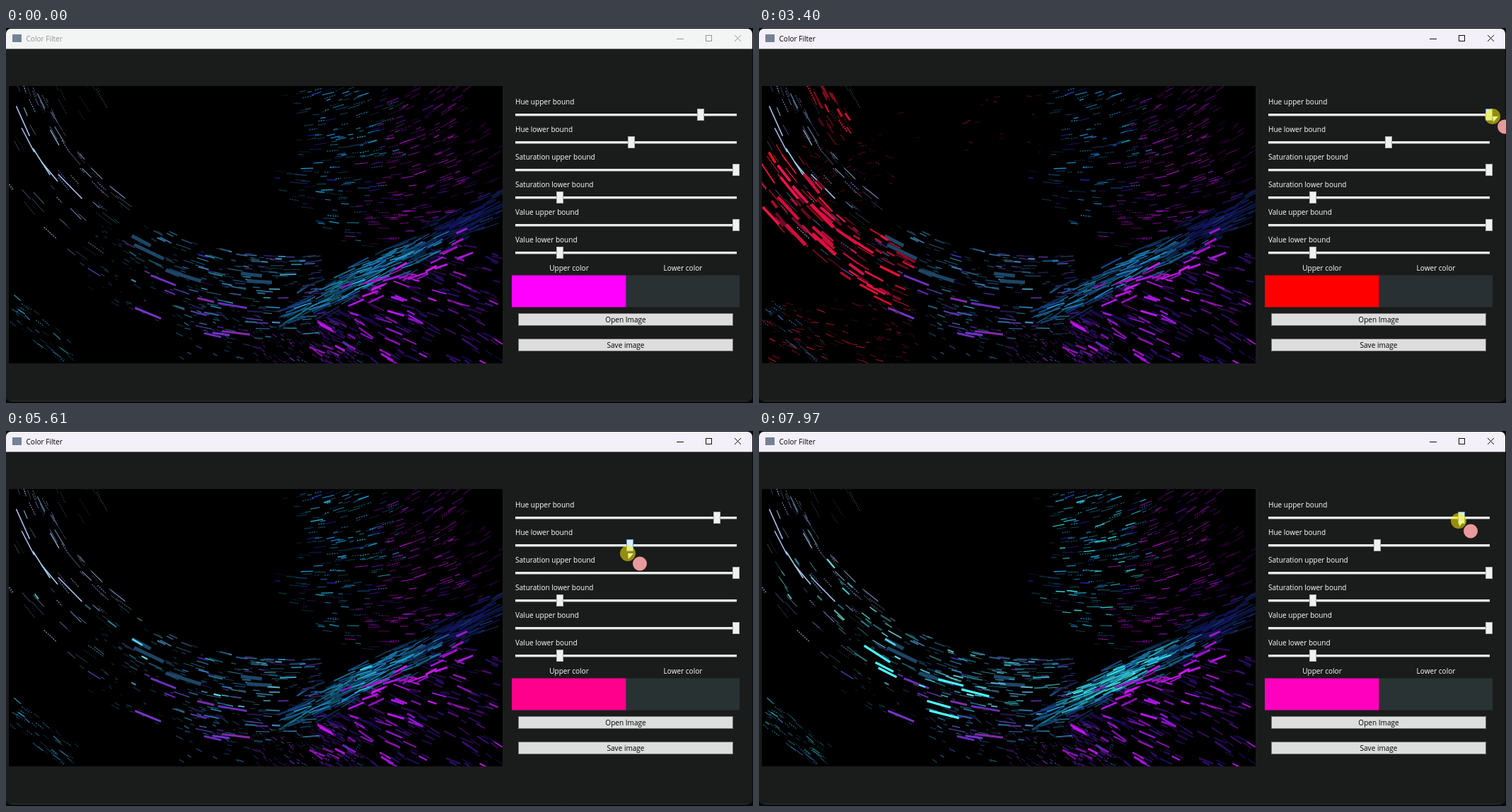
These frames come from a looping animation (1056x530 px, 8000 ms). An HTML page with a canvas:

```html
<!DOCTYPE html>
<html lang="en">
<head>
<meta charset="utf-8">
<title>Color Filter</title>
<style>
html, body { margin: 0; width: 100%; height: 100%; overflow: hidden; background: #000; }
canvas { display: block; }
</style>
</head>
<body>
<canvas id="stage" width="1056" height="530"></canvas>
<script>
const LOOP = 8000, STEP = 70, ENTER = 330, ACTIVATE = 1250;
const TRACK = { x: 720, w: 312, y: 123, gap: 39 };
const VIEW = { x: 4, y: 82, w: 698, h: 392 };
const LABELS = ['Hue upper bound', 'Hue lower bound', 'Saturation upper bound',
  'Saturation lower bound', 'Value upper bound', 'Value lower bound'];
const ctx = document.getElementById('stage').getContext('2d');

// Motion: eased moves of the two hue sliders and of the pointer that drags them
function ease(t, from, to) {
  const k = Math.min(1, Math.max(0, (t - from) / (to - from)));
  return k * k * (3 - 2 * k);
}
const upperAt = t => 982 + 50 * ease(t, 2800, 3280) - 30 * ease(t, 3600, 4440)
  + 3 * ease(t, 4650, 4850) + 13 * ease(t, 7100, 7420) - 25 * ease(t, 7420, 7960);
const lowerAt = t => 884 + 6 * ease(t, 1250, 2200) - 18 * ease(t, 5200, 6000) + 2 * ease(t, 6580, 6740);

function pointerAt(t, upper, lower) {
  const moves = [
    [330, 1110, lower, 167],
    [2220, 2360, 921, 157],
    [2400, 2780, upper + 5, 125],
    [3600, 4600, upper - 2, 134],
    [4900, 5200, lower - 3, 173],
    [6750, 7050, upper - 4, 127]
  ];
  return moves.reduce(([px, py], [from, to, x, y]) => {
    const k = ease(t, from, to);
    return [px + (x - px) * k, py + (y - py) * k];
  }, [1030, 520]);
}
function draggedSlider(t) {
  const within = (a, b) => t >= a && t < b;
  if (within(1250, 2220) || within(5200, 6750)) return 1;
  if (within(2790, 4900) || within(7050, LOOP)) return 0;
  return -1;
}

function hsv(h, s, v) {
  const l = v * (1 - s / 2), m = Math.min(l, 1 - l);
  return `hsl(${h} ${m ? (v - l) / m * 100 : 0}% ${l * 100}%)`;
}

let seed = 20;
function rand() {
  seed = (seed + 0x6D2B79F5) | 0;
  let r = Math.imul(seed ^ (seed >>> 15), 1 | seed);
  r = (r + Math.imul(r ^ (r >>> 7), 61 | r)) ^ r;
  return ((r ^ (r >>> 14)) >>> 0) / 4294967296;
}
const range = (a, b) => a + (b - a) * rand();
const chance = p => rand() < p;
const rad = d => d * Math.PI / 180;
function times(n, make) { for (let i = 0; i < n; i++) make(); }

// The streaks of the picture; each one passes the filter by its hue
const streaks = [];
function add(x, y, angle, len, width, hue, sat, val, dotted) {
  const dx = Math.cos(angle) * len / 2, dy = Math.sin(angle) * len / 2;
  streaks.push({ x, y, dx, dy, width, hue, dotted, color: hsv(hue, sat, val) });
}

// Rings around a point above the picture; phi is measured from straight down
function addArc(phi, r, ...look) {
  const a = rad(phi);
  add(390 - r * Math.sin(a), r * Math.cos(a) - 50, a + range(-.05, .05), ...look);
}
const bandY = x => 386 - (x - 435) * .5;

// Bottom right: purple fan
times(230, () => {
  const x = range(435, 702), y = range(Math.max(305, bandY(x) + 18), 476);
  const angle = rad(range(15, 33) + (y - 400) * .1);
  if (chance(.2)) add(x, y, angle, range(12, 26), range(1.6, 3.2), range(278, 292), .9, range(.6, .95));
  else add(x, y, angle, range(9, 22), range(.9, 2.6), range(250, 280), .88, range(.2, .48));
});
// Bottom centre: fine grains
times(150, () => add(range(345, 505), range(412, 474), rad(range(25, 50)), range(3, 9),
  range(.6, 1.2), chance(.2) ? range(195, 215) : range(255, 288), .8, range(.25, .75), chance(.5)));
times(34, () => add(range(240, 360), range(395, 472), rad(range(12, 42)), range(4, 12),
  range(.6, 1.4), range(192, 212), .8, range(.25, .65)));

// Top centre to right: blue turning magenta
function inUpper(x, y) {
  const bulge = 100 * Math.exp(-(((y - 225) / 30) ** 2)) * rand() ** 1.5;
  const left = 425 - bulge - 40 * rand() ** 2;
  const floor = x < 500 ? 240 + (x - 400) * .8 : 322 - (x - 500) * .45;
  return x > left && y < floor && !(x > 655 && y < 130);
}
const upperAngle = (x, y) => rad(-(x - 420) * .1 + (y - 190) * .13 + range(-4, 4));
times(760, () => {
  const x = range(310, 702), y = range(82, 324);
  if (!inUpper(x, y)) return;
  const angle = upperAngle(x, y), fade = x > 650 || x < 425 ? .6 : 1;
  if (x + range(-35, 35) > 560 - (y - 82) * .25)
    add(x, y, angle, range(6, 19), range(.6, 1.3),
      chance(.25) ? range(258, 280) : range(286, 299), .92, range(.25, .75) * fade, chance(.25));
  else
    add(x, y, angle, range(5, 18), range(.6, 1.5),
      chance(.15) ? range(225, 262) : range(189, 211), .85, range(.22, .85) * fade, chance(.35));
});
times(95, () => {
  const x = range(310, 545), y = range(84, 270);
  if (inUpper(x, y))
    add(x, y, upperAngle(x, y), range(7, 18), range(.8, 1.6), range(176, 188), .75, range(.35, .95));
});

// Left side of the arc: thin pale trails
times(75, () => addArc(range(36, 73), 365 + 115 * rand() ** 2, range(7, 28), range(.6, 1.4),
  range(194, 246), range(.24, .5), range(.25, .85), chance(.5)));
times(5, () => addArc(range(44, 68), range(400, 418), range(36, 50), 1.6, range(200, 232), .28, .92));
times(12, () => addArc(range(58, 70), range(290, 350), range(12, 32), range(.6, 1.1),
  range(220, 250), .3, range(.2, .38), true));
// Lower arc
times(165, () => addArc(36 - 44 * rand() ** .6, 372 + 118 * rand() ** 1.3, range(7, 24), range(.7, 2.3),
  chance(.7) ? range(189, 212) : range(248, 270), range(.6, .82), range(.25, .75)));
times(200, () => addArc(range(-10, 38), range(375, 500), range(3, 9), .7,
  range(189, 215), .75, range(.2, .65)));
times(7, () => addArc(range(5, 24), range(420, 500), range(24, 42), 3, range(262, 284), .75, range(.65, .9)));
times(5, () => addArc(range(-8, 30), range(400, 425), range(28, 58), 5, 206, .72, .4));
// Cyan part of the arc
times(115, () => addArc(60 - 64 * rand() ** .7, 372 + 80 * rand() ** 1.3, range(6, 22), range(.7, 2.3),
  range(176, 188), range(.45, .75), range(.35, .95)));
times(7, () => addArc(range(10, 32), range(420, 475), range(28, 44), 3.2, 181, .7, 1));

// Bottom left corner
times(75, () => {
  const x = range(4, 102);
  add(x, 386 + x * .8 + range(-22, 25), rad(range(34, 44)), range(5, 14), range(.6, 1.3),
    range(178, 213), .75, range(.2, .75), chance(.4));
});

// Diagonal band, denser in its middle
const alongBand = (from, to) => from + (to - from) * (rand() + rand()) / 2;
times(230, () => {
  const x = range(400, 702), far = x > 600;
  add(x, bandY(x) + range(-1, 1) * range(6, 32), rad(range(-33, -18)), range(12, 40), range(.8, 2.6),
    far ? range(212, 245) : range(192, 220), .82, far ? range(.2, .42) : range(.22, .6));
});
times(90, () => {
  const x = alongBand(395, 640);
  add(x, bandY(x) + range(-16, 18), rad(range(-31, -16)), range(10, 32), range(.7, 1.8),
    range(189, 206), .85, range(.5, .9));
});
times(60, () => {
  const x = alongBand(395, 600);
  add(x, bandY(x) + range(-15, 15), rad(range(-30, -17)), range(12, 32), range(.8, 2.2),
    range(177, 188), .75, range(.55, 1));
});
times(24, () => {
  const x = range(480, 650);
  add(x, bandY(x) + range(0, 45), rad(range(-28, -16)), range(12, 30), range(1.8, 3.2),
    range(280, 292), .9, range(.65, .95));
});

// Reds
times(95, () => addArc(range(24, 58), range(405, 490), range(9, 34), range(.8, 4),
  range(340, 354), .92, range(.3, .95)));
times(10, () => addArc(range(30, 54), range(415, 490), range(32, 46), range(3.5, 5), 346, .93, range(.8, 1)));
times(30, () => addArc(range(53, 66), range(315, 355), range(8, 26), range(.8, 3.5),
  range(344, 358), .9, range(.25, .8), chance(.3)));
times(120, () => add(range(6, 225), range(385, 474), rad(range(6, 30)), range(4, 14), range(.6, 1.3),
  range(345, 358), .88, range(.22, .7), chance(.5)));
times(60, () => add(range(60, 190), range(150, 260), rad(range(-40, 60)), range(3, 12), range(.6, 1.2),
  range(345, 358), .88, range(.22, .65), true));
times(18, () => add(range(190, 400), range(95, 185), rad(range(-20, 35)), range(3, 10), range(.6, 1.4),
  range(348, 359), .9, range(.2, .5)));

const picture = document.createElement('canvas');
picture.width = VIEW.w;
picture.height = VIEW.h;
const pic = picture.getContext('2d');
let filtered = '';

function filterPicture(low, high) {
  const key = low + '/' + high;
  if (key === filtered) return;
  filtered = key;
  pic.setTransform(1, 0, 0, 1, 0, 0);
  pic.fillStyle = '#000';
  pic.fillRect(0, 0, VIEW.w, VIEW.h);
  pic.translate(-VIEW.x, -VIEW.y);
  for (const s of streaks) {
    if (s.hue < low || s.hue > high) continue;
    pic.strokeStyle = s.color;
    pic.lineWidth = s.width;
    pic.setLineDash(s.dotted ? [2, 1.5] : []);
    pic.beginPath();
    pic.moveTo(s.x - s.dx, s.y - s.dy);
    pic.lineTo(s.x + s.dx, s.y + s.dy);
    pic.stroke();
  }
}

function box(x, y, w, h, fill, border) {
  ctx.fillStyle = fill;
  ctx.fillRect(x, y, w, h);
  if (!border) return;
  ctx.strokeStyle = border;
  ctx.strokeRect(x + .5, y + .5, w - 1, h - 1);
}
function text(str, x, y, color, align = 'left') {
  ctx.font = '500 10.05px "Open Sans", "Noto Sans", sans-serif';
  ctx.textAlign = align;
  ctx.fillStyle = color;
  ctx.fillText(str, x, y);
}
function line(...points) {
  ctx.beginPath();
  points.forEach(([x, y], i) => i ? ctx.lineTo(x, y) : ctx.moveTo(x, y));
  ctx.stroke();
}
function disc(x, y, r, color) {
  ctx.fillStyle = color;
  ctx.beginPath();
  ctx.arc(x, y, r, 0, 7);
  ctx.fill();
}
const inside = (p, x, y, w, h) => p && p[0] >= x && p[0] < x + w && p[1] >= y && p[1] < y + h;

function drawWindow(active) {
  box(0, 0, 1056, 530, '#050708');
  ctx.save();
  ctx.beginPath();
  ctx.roundRect(0, 1, 1055, 527, 7);
  ctx.clip();
  box(0, 0, 1056, 530, '#1a1c1b');
  box(0, 0, 1056, 29.5, active ? '#f3f0f9' : '#f3f5f4');
  ctx.restore();
  ctx.lineWidth = 1;
  ctx.strokeStyle = '#303536';
  line([7, 527.5], [1048, 527.5]);

  box(9, 9, 13, 11, '#748296');
  text('Color Filter', 28.5, 18.5, active ? '#000' : '#929292');
  ctx.strokeStyle = active ? '#111' : '#969696';
  line([948, 15.5], [958, 15.5]);
  line([1030, 10], [1039, 19]);
  line([1039, 10], [1030, 19]);
  ctx.strokeRect(989.5, 10.5, 8, 8);
}

function drawSlider(i, x, p, dragged) {
  const y = TRACK.y + i * TRACK.gap;
  text(LABELS[i], TRACK.x, y - 15.5, '#fff');
  box(TRACK.x, y - 2, TRACK.w + 1, 3.4, '#e7eaea');
  const thumb = [x - 5, y - 9, 10, 17];
  if (dragged) box(...thumb, '#daecfc', '#569de5');
  else if (inside(p, ...thumb)) box(...thumb, '#dcecfc', '#7eb4ea');
  else box(...thumb, '#f0f0f0', '#acacac');
}

function drawButton(label, y, p) {
  const area = [724, y, 304, 18];
  const hover = inside(p, ...area);
  box(...area, hover ? '#bee6fd' : '#dddddd', hover ? '#3c7fb1' : '#707070');
  text(label, 876, y + 13, '#000', 'center');
}

function drawPointer([x, y], pressed) {
  if (pressed) disc(x, y, 11, 'rgba(255,238,0,.54)');
  ctx.fillStyle = pressed ? '#f4f09a' : '#f4f4f4';
  ctx.beginPath();
  ctx.moveTo(x, y);
  ctx.lineTo(x + 8, y);
  ctx.lineTo(x + 1, y + 8);
  ctx.fill();
  disc(x + 17, y + 14.5, 10, '#e99a9c');
}

function draw(now) {
  const time = now % LOOP;
  const t = time < ENTER ? 0 : ENTER + Math.floor((time - ENTER) / STEP) * STEP;
  const upper = Math.round(upperAt(t)), lower = Math.round(lowerAt(t));
  const p = time < ENTER ? null : pointerAt(t, upper, lower);
  const dragged = draggedSlider(t);
  const hue = x => (x - TRACK.x) / TRACK.w * 360;

  drawWindow(t >= ACTIVATE);
  filterPicture(hue(lower), hue(upper));
  ctx.drawImage(picture, VIEW.x, VIEW.y);

  const full = TRACK.x + TRACK.w, fifth = Math.round(TRACK.x + TRACK.w * .2) + 1;
  [upper, lower, full, fifth, full, fifth].forEach((x, i) => drawSlider(i, x, p, dragged === i));

  text('Upper color', 796, 342.5, '#fff', 'center');
  text('Lower color', 957, 342.5, '#fff', 'center');
  box(876, 349.5, 161, 45, hsv(hue(lower), .2, .2));
  box(715, 349.5, 161.4, 45, hsv(Math.floor(hue(upper) / 3) * 3, 1, 1));
  drawButton('Open Image', 403, p);
  drawButton('Save image', 439, p);
  if (p) drawPointer(p, dragged >= 0);
}

function frame(now) {
  draw(now);
  requestAnimationFrame(frame);
}
requestAnimationFrame(frame);
</script>
</body>
</html>
```
